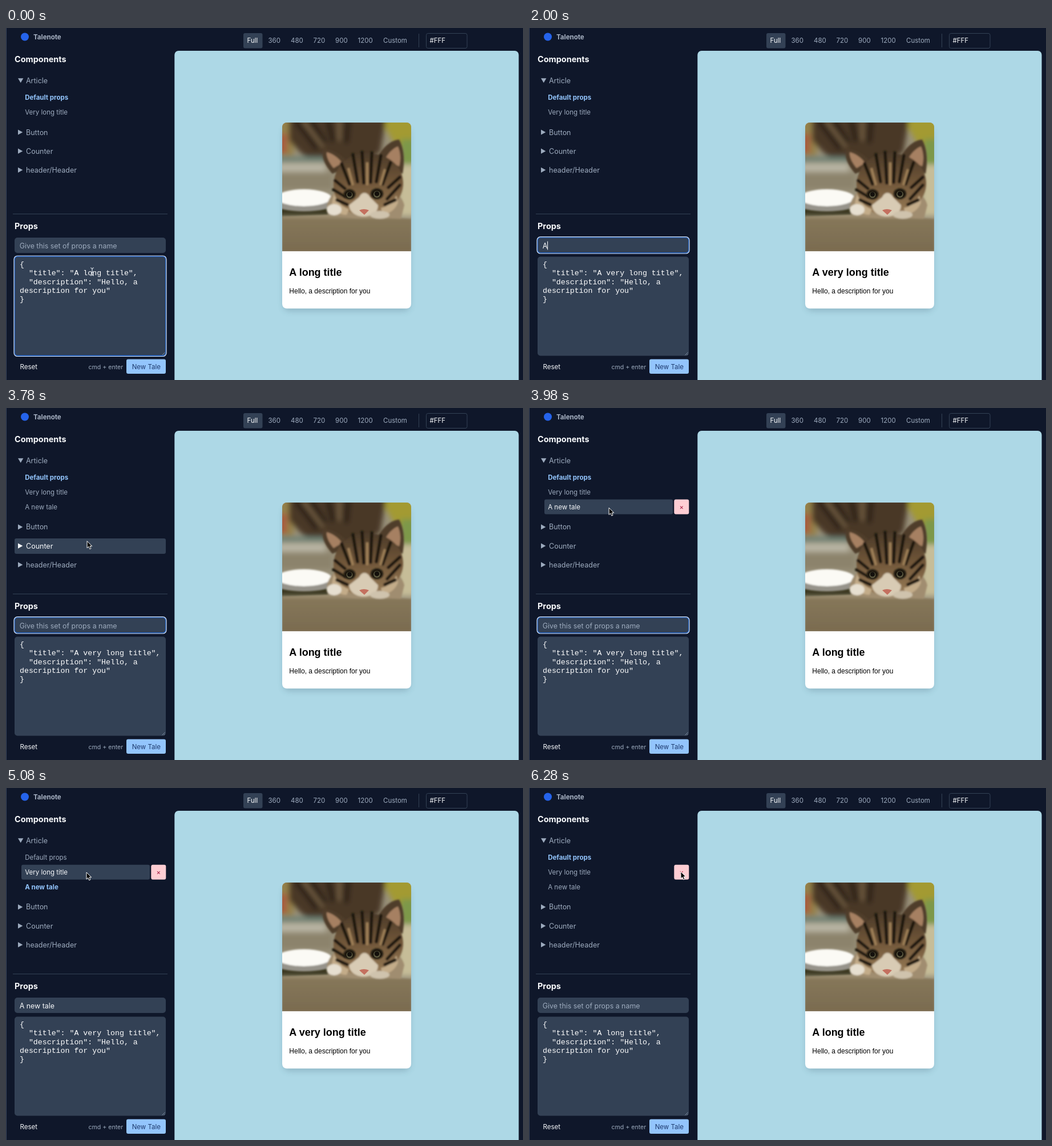
Recreate the animation shown at these times as an HTML page. Size 906 by 618 pixels, loop 6380 ms.

```html
<!DOCTYPE html>
<html lang="en">
<head>
<meta charset="utf-8">
<title>Component props editor</title>
<style>
  html, body { margin: 0; width: 100%; height: 100%; overflow: hidden; background: #0f172a; }
  svg { display: block; width: 100vw; height: 100vh; }
  text { white-space: pre; font-family: Inter, "Open Sans", sans-serif; }
  .card { font-family: "Liberation Sans", Arial, sans-serif; }
  .code { font: 13.25px "Liberation Mono", "Courier New", monospace; fill: #fff; }
  .head { font-size: 14.45px; font-weight: 700; fill: #f8fafc; }
  .item { font-size: 12.5px; }
  .field { font-size: 12.4px; }
  .small { font-size: 11.5px; }
</style>
</head>
<body>
<svg id="stage" viewBox="0 0 906 618" preserveAspectRatio="none">
  <defs>
    <clipPath id="photo"><path d="M484 392V174a8 8 0 0 1 8-8h210a8 8 0 0 1 8 8v218z"/></clipPath>
    <filter id="shade" x="-20%" y="-20%" width="140%" height="140%"><feGaussianBlur stdDeviation="6"/></filter>
    <filter id="soft" x="-30%" y="-30%" width="160%" height="160%"><feGaussianBlur stdDeviation="5"/></filter>
    <filter id="fur" x="-10%" y="-10%" width="120%" height="120%"><feGaussianBlur stdDeviation="1.8"/></filter>
    <linearGradient id="ledge" x1="0" y1="0" x2="0" y2="1">
      <stop offset="0" stop-color="#a39578"/><stop offset=".16" stop-color="#857659"/><stop offset="1" stop-color="#7a6b4f"/>
    </linearGradient>
    <linearGradient id="face" x1="0" y1="0" x2="0" y2="1">
      <stop offset="0" stop-color="#4b3a28"/><stop offset=".45" stop-color="#6f5538"/><stop offset="1" stop-color="#9a7d58"/>
    </linearGradient>
  </defs>

  <rect width="906" height="618" fill="#0f172a"/>
  <rect width="1" height="618" fill="#39445a"/>
  <circle cx="33" cy="15.5" r="7" fill="#2563eb"/>
  <g id="chrome"></g>
  <path d="M12 326.500H283M723.500 10V34" stroke="#334155"/>

  <path d="M295.300 618V47a7 7 0 0 1 7-7h589.200a7 7 0 0 1 7 7v571z" fill="#add8e6"/>
  <rect x="487" y="175" width="220" height="321" rx="8" fill="#27465a" opacity=".26" filter="url(#shade)"/>
  <rect x="484" y="166" width="226" height="326.500" rx="8" fill="#fff"/>

  <g clip-path="url(#photo)">
    <rect x="484" y="166" width="226" height="226" fill="#98907a"/>
    <g filter="url(#soft)">
      <path d="M476 158h28v66h-28z" fill="#94804a"/>
      <path d="M476 186h16v34h-16z" fill="#a85a3c"/>
      <path d="M655 158h65v42l-35 10z" fill="#a39a30"/>
      <path d="M692 195h26v44h-26z" fill="#7d984a"/>
      <path d="M688 240h32v90h-32z" fill="#c6bd98"/>
      <path d="M496 158h170l-10 60-50 34-50-20-34-8-26-26z" fill="#4a3826"/>
      <path d="M476 226h84v9h-84z" fill="#6d8174"/>
      <path d="M476 238h84v14h-84z" fill="#b9b5a4"/>
      <path d="M476 255h96v28h-96z" fill="#8c836c"/>
      <path d="M476 308h105v22h-105z" fill="#37341f"/>
      <path d="M508 163l38 50M534 162l26 40M564 162l10 38M600 162l-4 40" stroke="#251d14" stroke-width="8"/>
      <path d="M520 163l36 46M584 162v36" stroke="#806a4c" stroke-width="4"/>
    </g>
    <g filter="url(#fur)">
      <ellipse cx="522" cy="310" rx="50" ry="12" fill="#96938a"/>
      <ellipse cx="522" cy="298" rx="48" ry="15" fill="#fbfaf5"/>
      <path d="M484 331l100-4 126 8v57H484z" fill="url(#ledge)"/>
      <path d="M562 316c2-25 26-45 62-45s70 18 74 40l-6 24-40-2c-30 4-70 0-88-6z" fill="#a08d70"/>
      <path d="M572 256C556 238 552 222 557 212c18 2 36 12 46 30zM650 228c12-22 28-32 39-32 9 16 10 38 6 60z" fill="#4f3c29"/>
      <path d="M574 246c-9-11-13-21-12-28 11 3 20 9 27 19zM664 230c8-13 16-20 23-22 5 12 5 24 2 35z" fill="#a68062"/>
      <path d="M574 272c4-34 28-52 60-52 36 0 62 22 62 54-1 28-22 44-50 54-14 4-26 3-38-2-24-10-35-30-34-54z" fill="url(#face)"/>
      <path d="M619 297c4-10 14-10 19 0l14 14c0 14-12 20-25 20s-25-7-26-20z" fill="#d8cbb4"/>
      <path d="M575 292c6 14 14 22 26 26l-4 10c-14 0-24-8-26-20zM684 294c-6 12-16 20-27 22l3 12c14-2 24-12 27-22z" fill="#c3ac89"/>
      <path d="M608 222l8 48M624 218l3 54M641 219l-2 52M657 224l-8 46M588 238l14 36M674 236l-14 38M574 284l20 12M690 276l-22 24M577 268l17 14M690 262l-20 18M580 302l18 8M682 302l-18 8" fill="none" stroke="#1f1811" stroke-width="5.500" stroke-linecap="round"/>
      <path d="M600 246l8 30M633 236v40M664 248l-8 28" stroke="#a08158" stroke-width="4"/>
      <ellipse cx="575" cy="319" rx="13" ry="10" fill="#e6dfd0"/>
      <ellipse cx="655" cy="328" rx="17" ry="7" fill="#cfc3ad"/>
    </g>
    <g filter="url(#fur)" fill="#1a150f">
      <ellipse cx="602" cy="292" rx="10.500" ry="9"/><ellipse cx="650" cy="291" rx="11" ry="9.500"/>
    </g>
    <g fill="#5a583f"><circle cx="602" cy="293" r="5.500"/><circle cx="650" cy="292" r="6"/></g>
    <g fill="#14110d"><circle cx="602" cy="292" r="4"/><circle cx="650" cy="291" r="4.300"/></g>
    <path d="M619 320q8-4 17 0l-8 8z" fill="#c4705f"/>
  </g>

  <g id="ui"></g>
  <path id="beam" d="M-3-7q3 0 3 2.500q0-2.500 3-2.500M0-5V5M-3 7q3 0 3-2.500q0 2.500 3 2.500M-2 1h4" fill="none" stroke="#e2e8f0"/>
  <path id="arrow" d="M0 0V12.200L2.800 9.600 4.700 14 6.900 13 5 8.800H8.700z" fill="#000" stroke="#fff" stroke-linejoin="round"/>
</svg>
<script>
const LOOP = 6380, SUBMIT = 3000, SELECT = 4360, REVERT = 5440;
const WHITE = '#f8fafc', GREY = '#9dabbe', SLATE = '#334155', BLUE = '#93c5fd';
const $ = id => document.getElementById(id);

function add(parent, tag, attrs, content = '') {
  const el = document.createElementNS('http://www.w3.org/2000/svg', tag);
  el.textContent = content;
  set(el, attrs);
  parent.append(el);
  return el;
}
function set(el, attrs) {
  for (const key in attrs) el.setAttribute(key, attrs[key]);
}
function show(el, on) { el.style.display = on ? '' : 'none'; }

const base = $('chrome'), ui = $('ui');
const rect = (x, y, width, height, rx, fill, parent = ui) => add(parent, 'rect', { x, y, width, height, rx, fill });
const label = (x, y, content, cls, fill, parent = ui) => add(parent, 'text', { x, y, class: cls, fill }, content);

// Fixed parts
label(48, 20.4, 'Talenote', 'small', '#a9b4c5', base).style.fontWeight = 700;
label(15, 60.2, 'Components', 'head', WHITE, base);
label(15, 352.7, 'Props', 'head', WHITE, base);
rect(416, 9, 33.5, 26.5, 3, SLATE, base);
[['Full', 422.5], ['360', 459.5], ['480', 499], ['720', 538.5], ['900', 577], ['1200', 616.5], ['Custom', 661]]
  .forEach(([name, x], i) => label(x, 26.4, name, 'small', i ? GREY : WHITE, base));
set(rect(736.5, 9.5, 71.5, 26, 3, 'none', base), { stroke: SLATE });
label(742.5, 26.4, '#FFF', 'small', WHITE, base);
rect(15, 368, 265, 27, 5, SLATE, base);
rect(15, 401.5, 265, 174, 5, SLATE, base);
add(base, 'path', { d: 'M273.500 574.500l5-5M276.500 574.500l2-2', stroke: '#94a3b8', 'stroke-width': .8 });
label(24.5, 598.7, 'Reset', 'small', WHITE, base);
label(144.5, 598.5, 'cmd + enter', '', GREY, base).style.fontSize = '10.6px';
rect(211, 581.5, 69, 25.5, 3, BLUE, base);
label(220.7, 598.7, 'New Tale', 'small', '#1e3a6e', base);

// Component tree
function group(name, cy, open) {
  const bar = rect(15, cy - 13.2, 265, 27, 3, SLATE);
  const icon = add(ui, 'path', {});
  const text = label(35, 0, name, 'item', GREY);
  return (shift, hover) => {
    const y = cy + shift, fill = hover ? WHITE : GREY;
    show(bar, hover);
    set(bar, { y: y - 13.2 });
    set(icon, { fill, d: open ? `M21 ${y - 3.8}h9.400l-4.700 8z` : `M21 ${y - 4.6}v9.200l8.300-4.600z` });
    set(text, { y: y + 4.5, fill });
  };
}
const groups = [['Article', 92, true], ['Button', 183], ['Counter', 216.2], ['header/Header', 249.3]]
  .map(([name, cy, open]) => ({ cy, draw: group(name, cy, open) }));

function tale(name, cy, removable) {
  const bar = rect(27, cy - 13, removable ? 225 : 253, 26, 3, SLATE);
  const text = label(33.2, cy + 4.2, name, 'small', GREY);
  const close = add(ui, 'g', {});
  rect(254.3, cy - 13, 26, 26, 3, '#fecdd3', close);
  set(label(267.3, cy + 4, '×', 'small', '#9f1239', close), { 'text-anchor': 'middle' });
  return (visible, active, over, overClose) => {
    show(text, visible);
    show(bar, visible && over && !overClose);
    show(close, visible && over && removable);
    set(text, { fill: active ? BLUE : over && !overClose ? WHITE : GREY, 'font-weight': active ? 700 : 400 });
  };
}
const tales = [['Default props', 121.5], ['Very long title', 147.8, true], ['A new tale', 173.5, true]]
  .map(([name, cy, removable]) => ({ cy, draw: tale(name, cy, removable) }));

// Editable fields
function ring(x, y, width, height) {
  const g = add(ui, 'g', { fill: 'none' });
  set(rect(x + 1.2, y + 1.2, width - 2.4, height - 2.4, 5, 'none', g), { stroke: '#1d5fc4', 'stroke-width': 1.4 });
  set(rect(x, y, width, height, 6, 'none', g), { stroke: '#dbeafe', 'stroke-width': 1.2 });
  return g;
}
const nameRing = ring(14, 366.7, 267, 29.3), codeRing = ring(14, 400, 267, 176.5);
const nameText = label(23.7, 386.5, '', 'field', WHITE);
const lines = ['{', '', '  "description": "Hello, a', 'description for you"', '}']
  .map((line, i) => label(24, 419 + i * 15.3, line, 'code', WHITE));
const caret = rect(0, 0, 1, 15, 0, '#fff');
const cardTitle = label(496.3, 434.8, '', 'card', '#000');
set(cardTitle, { 'font-size': 18, 'font-weight': 700 });
set(label(496.3, 465.7, 'Hello, a description for you', 'card', '#000'), { 'font-size': 12 });

// Pointer legs: start, end, from, to, easing power
const legs = [
  [20, 220, [151, 428], [136, 430], 2],
  [940, 1000, [136, 430], [151, 414], 1],
  [1000, 1200, [151, 414], [147, 382], 2],
  [3620, 4100, [147, 382], [140, 172], 3],
  [4560, 4660, [140, 172], [140, 158], 1],
  [4660, 4840, [140, 158], [141, 148], 2],
  [5220, 5400, [141, 148], [142, 129], 2],
  [5860, 6280, [142, 129], [266, 147], 2.2]
];
function pointer(t) {
  let pos = legs[0][2];
  for (const [start, end, from, to, power] of legs) {
    if (t < start) break;
    const p = 1 - (1 - Math.min(1, (t - start) / (end - start))) ** power;
    pos = from.map((v, i) => v + (to[i] - v) * p);
  }
  return pos;
}

const between = (t, a, b) => t >= a && t < b;
function typedName(t) {
  if (between(t, SELECT, REVERT)) return 'A new tale';
  if (!between(t, 1740, SUBMIT)) return '';
  const count = t < 2010 ? 1 : t < 2240 ? 2 : 3 + Math.floor((t - 2240) / 70);
  return 'A new tale'.slice(0, count);
}

function draw(t) {
  const count = Math.max(0, Math.min(5, Math.floor((t - 400) / 110) + 1));
  const edit = 'A ' + 'very '.slice(0, count) + 'long title';
  const propsTitle = t < REVERT ? edit : 'A long title';
  lines[1].textContent = `  "title": "${propsTitle}",`;
  cardTitle.textContent = between(t, SUBMIT, SELECT) ? 'A long title' : propsTitle;

  const name = typedName(t);
  nameText.textContent = name || 'Give this set of props a name';
  set(nameText, { fill: name ? WHITE : GREY });
  show(codeRing, t < 1240);
  show(nameRing, between(t, 1240, SELECT));

  const inCode = between(t, 200, 960);
  show(caret, inCode || between(t, 1240, 1500) || between(t, 1740, 3620));
  set(caret, inCode
    ? { x: 24 + (14 + count) * 7.95, y: 423 }
    : { x: 23.5 + (name ? nameText.getComputedTextLength() : 0), y: 374.5 });

  const [x, y] = pointer(t);
  const overField = y > 368;
  const awake = t < 400 || between(t, 960, 1740) || t >= 3620;
  show($('beam'), awake && overField);
  show($('arrow'), awake && !overField);
  for (const id of ['beam', 'arrow']) set($(id), { transform: `translate(${x} ${y})` });

  // The rows react slightly below the pointer tip
  const added = t >= SUBMIT;
  const hit = cy => awake && Math.abs(y + 4 - cy) < 12.8;
  groups.forEach(({ cy, draw }, i) => {
    const shift = i && added ? 25.9 : 0;
    draw(shift, hit(cy + shift));
  });
  const active = between(t, SELECT, REVERT) ? 2 : 0;
  tales.forEach(({ cy, draw }, i) => draw(i < 2 || added, i === active, hit(cy), x > 253));
}

function tick(now) {
  draw(now % LOOP);
  requestAnimationFrame(tick);
}
draw(0);
requestAnimationFrame(tick);
</script>
</body>
</html>
```
